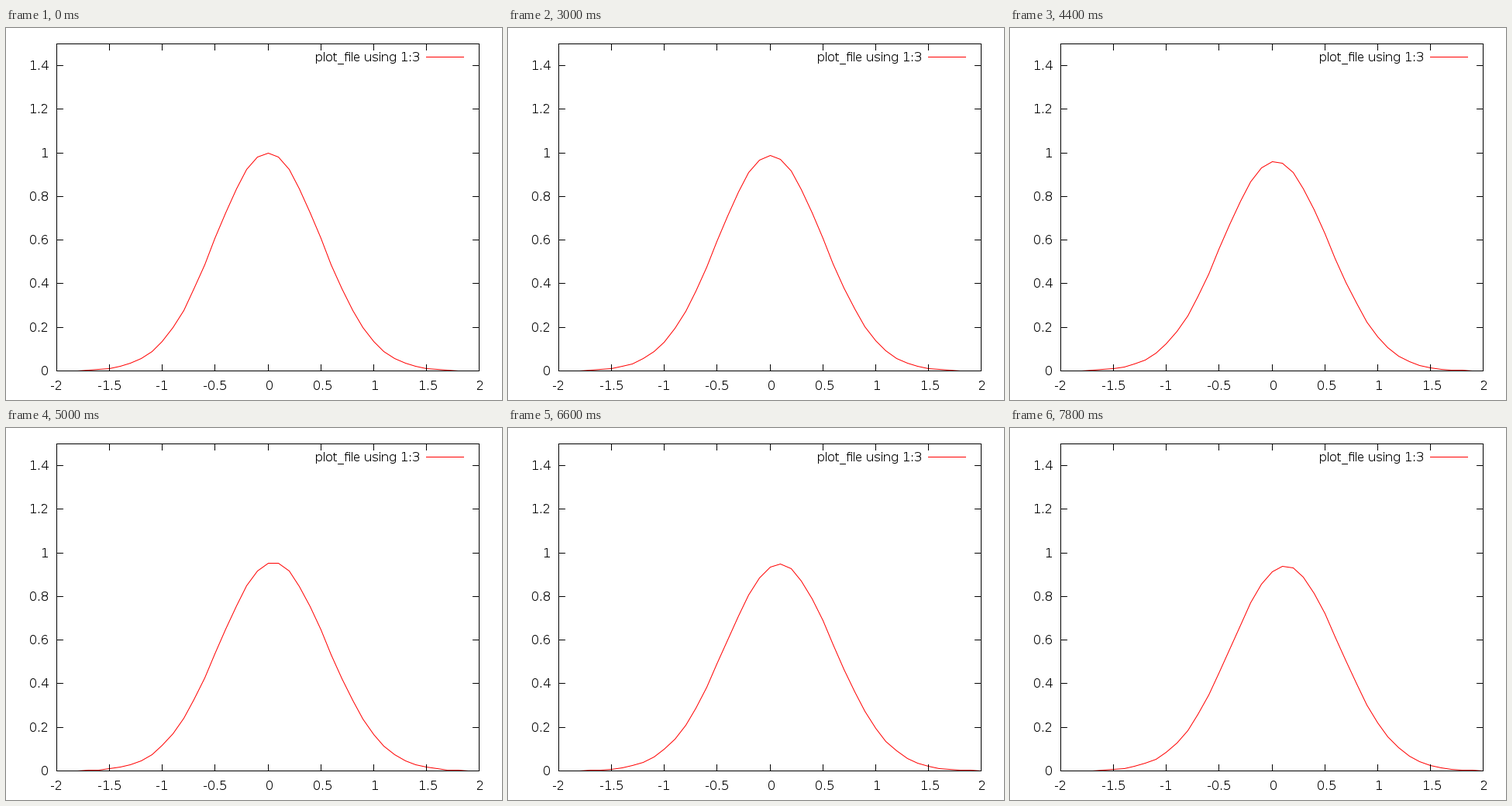
Animation of 640x480 px, one loop 8000 ms. Source, as a matplotlib script:

```python
import numpy as np
import matplotlib.pyplot as plt
from matplotlib.animation import FuncAnimation

W, H, DPI = 640, 480, 64
PX = 72 / DPI                       # points per pixel
LEFT, RIGHT, TOP, BOTTOM = 65, 610, 20, 442
FRAMES, STEP_MS = 40, 200

# Full-pixel hinting gives thin, crisp stems
plt.rcParams.update({"font.family": "DejaVu Sans", "text.hinting": "no_autohint",
                     "text.hinting_factor": 1})

fig = plt.figure(figsize=(W / DPI, H / DPI), dpi=DPI, facecolor="white")
ax = fig.add_axes([0, 0, 1, 1])
ax.set_xlim(0, W)
ax.set_ylim(H, 0)
ax.axis("off")


def to_x(v):
    return np.floor(LEFT + (v + 2) * (RIGHT - LEFT) / 4 + 0.5)


def to_y(v):
    return np.floor(BOTTOM - v * (BOTTOM - TOP) / 1.5 + 0.5)


def rule(xs, ys, color="black"):
    # Snapping moves these whole numbers to pixel centres
    ax.plot(np.array(xs) + 0.1, np.array(ys) + 0.1, color=color, lw=PX,
            antialiased=False, solid_capstyle="projecting", snap=True, zorder=3)


def label(x, y, text, ha):
    ax.text(x, y, text, fontsize=16 * PX, ha=ha, va="baseline", color="black")


# Frame, ticks and tick labels
rule([LEFT, RIGHT, RIGHT, LEFT, LEFT], [TOP, TOP, BOTTOM, BOTTOM, TOP])
for v in np.arange(-2, 2.1, 0.5):
    x = to_x(v)
    rule([x, x], [BOTTOM, BOTTOM - 8])
    rule([x, x], [TOP, TOP + 8])
    label(x + (0.2 if v < 0 else 2.2), 467, f"{v:g}", "center")
for v in np.arange(0, 1.5, 0.2):
    y = to_y(v)
    rule([LEFT, LEFT + 8], [y, y])
    rule([RIGHT, RIGHT - 8], [y, y])
    label(55, y + 6, f"{v:.2g}", "right")

# Legend
label(533.7, 43, "plot_\ufb01le using 1:3", "right")
rule([542, 590], [37, 37], color="red")

# Bell parameters at a few steps: the packet drifts right, flattens and widens
KEYS = np.array([0, 7, 12, 15, 19, 25, 33, 39])
HEIGHT = [1, 0.9975, 0.994, 0.988, 0.969, 0.957, 0.949, 0.941]
MEAN = [0, 0.0003, 0.002, 0.006, 0.0177, 0.048, 0.090, 0.125]
VAR = [0.25, 0.25, 0.2508, 0.252, 0.2575, 0.26, 0.2625, 0.264]


def smooth(t, values):
    """Cubic Hermite interpolation through the key steps."""
    v = np.array(values, float)
    slope = np.gradient(v, KEYS)
    i = min(np.searchsorted(KEYS, t, side="right") - 1, len(KEYS) - 2)
    d = KEYS[i + 1] - KEYS[i]
    u = (t - KEYS[i]) / d
    return ((1 + 2 * u) * (1 - u) ** 2 * v[i] + u * (1 - u) ** 2 * d * slope[i]
            + u * u * (3 - 2 * u) * v[i + 1] + u * u * (u - 1) * d * slope[i + 1])


grid = np.linspace(-2, 2, 41)
curve, = ax.plot([], [], color="red", lw=PX, snap=False, zorder=2)


def draw(step):
    height, mean, var = (smooth(step, p) for p in (HEIGHT, MEAN, VAR))
    bell = height * np.exp(-(grid - mean) ** 2 / (2 * var))
    curve.set_data(to_x(grid) + 0.5, to_y(bell) + 0.5)
    return curve,


anim = FuncAnimation(fig, draw, frames=FRAMES, interval=STEP_MS,
                     init_func=lambda: draw(0), repeat=True, repeat_delay=0)
plt.show()
```
